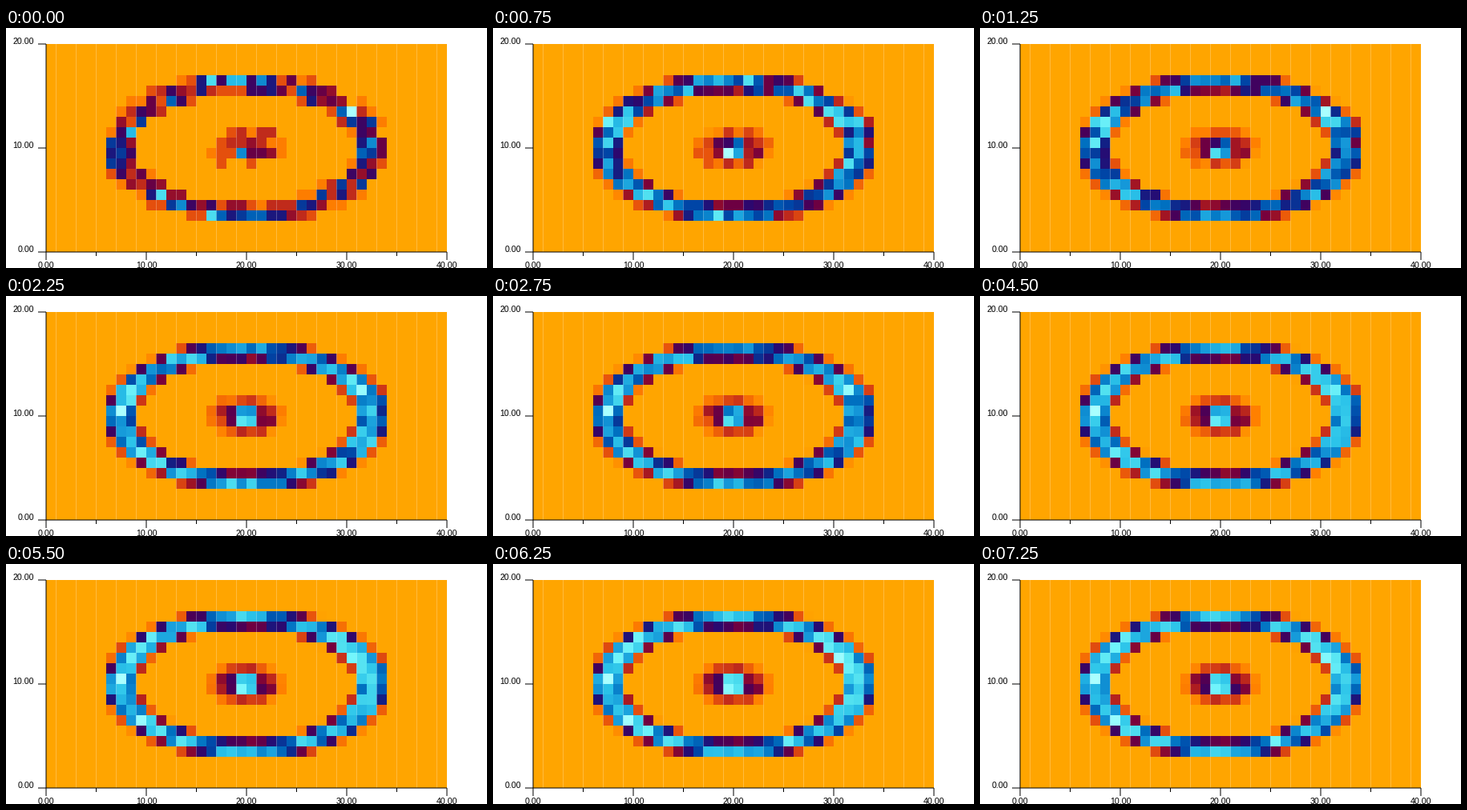
Recreate the animation shown at these times as a matplotlib script. Size 600x300 px, loop 7.75 s.

```python
import numpy as np
import matplotlib.pyplot as plt
from matplotlib.animation import FuncAnimation
from matplotlib.colors import LinearSegmentedColormap

W, H, DPI = 600, 300, 100
LEFT, TOP, RIGHT, BOTTOM = 50, 20, 550, 280
COLS, ROWS = 40, 20
STEPS, FRAMES, INTERVAL = 30, 31, 250
SAMPLES, DISC_SHARE = 800, 0.08

# Evenly spaced stops, from empty to fullest cell.
HEAT = LinearSegmentedColormap.from_list("heat", [
    "#ffa500", "#ff8000", "#e8540c", "#c8301a", "#a01424", "#78003c",
    "#4a0058", "#280a72", "#102488", "#0048a8", "#0070c0", "#1496d8",
    "#2cc4ea", "#50e0f0", "#74f6fc", "#aaffff"])

rng = np.random.default_rng(7)


def batch():
    """Counts of one batch: a ring, and a small disc for a share of the hits."""
    u = rng.random(SAMPLES)
    disc = rng.random(SAMPLES) < DISC_SHARE
    r = np.where(disc, 0.25 * u, 0.8 + 0.2 * u)
    angle = rng.uniform(0, 2 * np.pi, SAMPLES)
    x = 20 + 14 * r * np.cos(angle)
    y = 10 + 7 * r * np.sin(angle)
    return np.histogram2d(y, x, bins=(ROWS, COLS),
                          range=((0, ROWS), (0, COLS)))[0]


totals = np.cumsum([batch() for _ in range(STEPS)], axis=0)


def paint(counts):
    """Pixel image of the cells; edges at half pixels let some white through."""
    cells = HEAT(counts / counts.max())[:, :, :3]
    px = np.arange(RIGHT - LEFT)
    strip = cells[:, (px * 2) // 25]
    seam = px[px % 25 == 12]
    strip[:, seam] = 0.25 + 0.25 * strip[:, seam - 1] + 0.5 * strip[:, seam + 1]
    return np.repeat(strip, (BOTTOM - TOP) // ROWS, axis=0)


fig = plt.figure(figsize=(W / DPI, H / DPI), dpi=DPI, facecolor="white")
ax = fig.add_axes([0, 0, 1, 1])
image = ax.imshow(paint(totals[0]), extent=(LEFT, RIGHT, BOTTOM, TOP),
                  interpolation="nearest", aspect="auto")
ax.set_xlim(0, W)
ax.set_ylim(H, 0)
ax.axis("off")


def line(x0, y0, x1, y1):
    ax.plot([x0, x1], [y0, y1], color="black", lw=72 / DPI, snap=False,
            solid_capstyle="butt", zorder=3)


def label(x, y, value, align):
    ax.text(x, y, f"{value:.2f}", ha=align, va="baseline", color="black",
            family="Liberation Sans", fontsize=10.67 * 72 / DPI)


line(LEFT, TOP, LEFT, BOTTOM)
line(LEFT, BOTTOM, RIGHT, BOTTOM)
for value in (0, 10, 20):
    y = BOTTOM - 13 * value
    line(LEFT - 10, y, LEFT, y)
    label(LEFT - 15, y, value, "right")
for value in range(0, 41, 5):
    x = LEFT + 12.5 * value
    major = value % 10 == 0
    line(x, BOTTOM, x, BOTTOM + (10 if major else 5))
    if major:
        label(x, H, value, "center")


def update(frame):
    image.set_data(paint(totals[min(frame, STEPS - 1)]))
    return [image]


anim = FuncAnimation(fig, update, frames=FRAMES, interval=INTERVAL, repeat=True)
plt.show()
```
